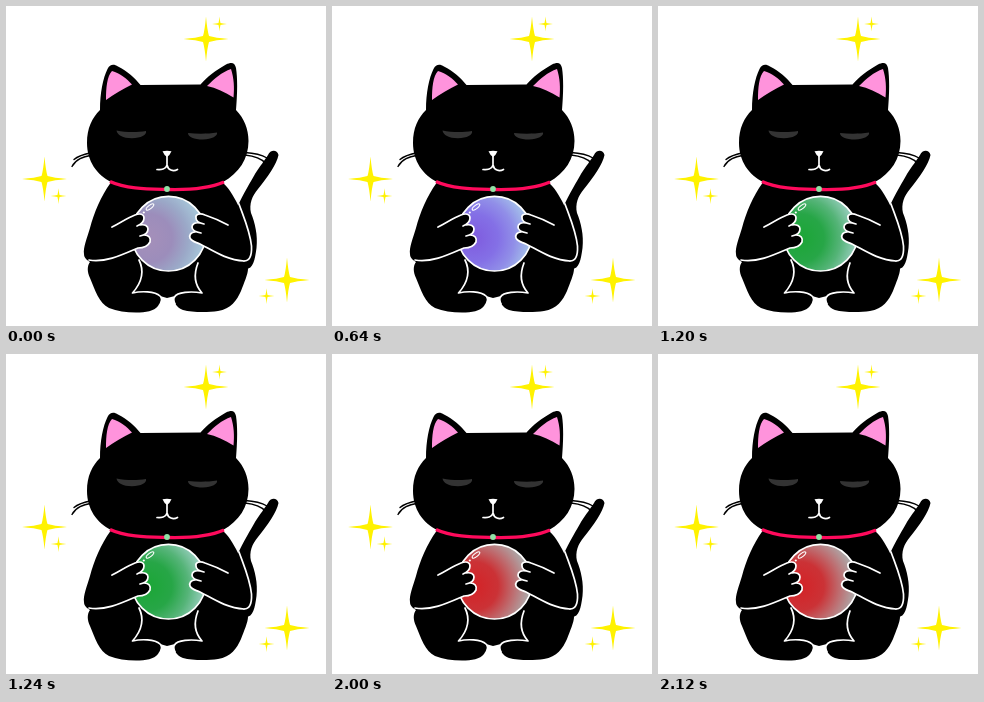
These frames come from a looping animation (320x320 px, 2.24 s). An HTML page:

```html
<!DOCTYPE html>
<html lang="en">
<head>
<meta charset="utf-8">
<title>Cat with a crystal ball</title>
<style>
html, body { margin: 0; width: 100%; height: 100%; overflow: hidden; background: #fff; }
svg { display: block; width: 100vw; height: 100vh; }
.line { fill: none; stroke: #fff; stroke-width: 1.7; stroke-linecap: round; stroke-linejoin: round; }
.hand { fill: #000; }
.whisker { fill: none; stroke: #000; stroke-width: 1.4; stroke-linecap: round; }
</style>
</head>
<body>
<svg viewBox="0 0 320 320">
  <defs>
    <path id="star" fill="#fff200" d="M0-22.500Q1.200-9 3-3Q9-1.200 22.500 0Q9 1.200 3 3Q1.200 9 0 22.500Q-1.200 9-3 3Q-9 1.200-22.500 0Q-9-1.200-3-3Q-1.200-9 0-22.500Z"/>
  </defs>
  <g id="stars"></g>

  <!-- tail -->
  <path d="M262 149C264 144 271 143 272.500 149C271 158 261 172 252 183C246 190 243 198 245 207C249 217 252 229 250.500 242C249 254 247 263 240 263L232 200C234 194 241 182 249 168C255 159 258 155 262 149Z"/>

  <!-- body and legs -->
  <path d="M104.500 177C95 190 88 207 84 222C81 232 77 242 78 248C78 252 81 254 84 256C81 260 81 266 84 272C89 284 93 297 103 302C111 305 120 306.500 130 306.500C140 306.500 148 305 152 300C154 297 156 294 154 290L161 292L169 290C166 295 171 302 177 304C186 306.500 202 306.500 212 305C225 303 231 294 235 285C238 277 242 268 242 263C242 260 241 257 240 255C245 254 246 248 245 241C243 226 238 213 232 199C227 189 222 181 217 177Z"/>
  <path class="line" d="M233 198C238 212 244 225 245.500 240C246 251 243 255 238 255"/>
  <path class="line" d="M133 254C137 262 138 274 126.500 287C135 285 149 285 154 290C156 292 156 295 155 297M192 257C188 267 188 278 196 287C185 285 171 286 168.500 291C167 293 168 296 169 298"/>

  <!-- ball -->
  <g id="balls"></g>
  <circle class="line" cx="162.500" cy="227.700" r="37.300"/>
  <ellipse class="line" style="stroke-width:1.100" cx="144" cy="201" rx="4.600" ry="1.700" transform="rotate(-38 144 201)"/>
  <circle cx="137.800" cy="206.500" r="1.100" fill="#fff"/>

  <!-- hands -->
  <path class="hand" d="M106 221C114 217 121 212 129 209C134 207 138 208 138 212C138 215 136 217 134 219C139 218 142 220 142 223C142 226 140 228 138 229C143 229 145 232 144 236C142 240 138 242 132 242C118 248 105 254 92 255Z"/>
  <path class="line" d="M106 221C114 217 121 212 129 209C134 207 138 208 138 212C138 215 136 218 131 220M134 219C139 218 142 220 142 223C142 226 140 229 134 230M138 229C143 229 145 232 144 236C142 240 138 242 132 242C118 248 100 257 83 254"/>
  <path class="hand" d="M222 219C213 214 205 211 199 209C194 207 189 208 190 212C190 214 192 216 194 217C189 216 186 218 186 221C186 223 187 225 189 226C185 226 183 229 184 232C186 236 190 236 194 238C206 244 220 254 238 255Z"/>
  <path class="line" d="M222 219C213 214 205 211 199 209C194 207 189 208 190 212C190 215 193 217 198 218M194 217C189 216 186 218 186 221C186 224 189 226 195 227M189 226C185 226 183 229 184 232C186 236 190 236 194 238C206 244 220 254 238 255"/>

  <!-- head -->
  <path class="whisker" d="M86 146.500C79 148 72 150 68 153.500M86 149C77 151 70 153 66 160.500M239 146.500C248 147 256 149 261 152M239 149C248 150 255 152 259 157"/>
  <path d="M94 104C94 87 97 72 101.500 63C104 58 108 58 112 60.500C121 65 129 72 134.500 79L194.500 78.500C201 71 210 64 220 58.500C226 55.500 229 57 230 62C232 75 231 91 230 104C238 112 242.500 123 242.500 135C242.500 153 233 167 217 176C183 186 139 186 105 176C91 169 81 155 81 137C81 122 86 112 94 104Z"/>
  <g fill="#ff93dc">
    <path d="M106 65C114 67 121 73 126 78.500C117 83 108 88 100 94C100 82 101 70 106 65Z"/>
    <path d="M225 63C228 72 228.500 82 227.500 91.500C219 86 210 82 201 80C208 73 216 66 225 63Z"/>
  </g>
  <g fill="#333">
    <path d="M110.500 124.500C120 126.500 131 126.500 140 125C141 129 135 132 126 132.200C117 132.200 111 129 110.500 124.500Z"/>
    <path d="M182 127C191 128 202 128 211 126.500C212 130 206 133 197 133.500C188 133.500 182 131 182 127Z"/>
  </g>
  <path fill="#fff" d="M156.500 145.300Q161 144.300 165.500 145.300Q164 149 161 151Q158 149 156.500 145.300Z"/>
  <path class="line" d="M161 149V158.500M151 163.500C155 164 160 163 161 159C162 164 167 166 171.500 163.500"/>

  <!-- collar -->
  <path fill="none" stroke="#ff0a5c" stroke-width="3.300" d="M104 175.500C120 183 142 183 161 183.500C180 184 202 183 218 176"/>
  <circle cx="161" cy="183" r="2.900" fill="#8fe3a6"/>
</svg>
<script>
const NS = "http://www.w3.org/2000/svg";
const LOOP = 2240;

function add(parent, tag, attrs) {
  const el = document.createElementNS(NS, tag);
  for (const key in attrs) el.setAttribute(key, attrs[key]);
  parent.append(el);
  return el;
}

// x, y, scale
const stars = [
  [200, 33, 1], [213.500, 18, .33],
  [38.500, 173, 1], [52.500, 190, .35],
  [281, 274, 1], [260.500, 290, .35]
];
const sky = document.getElementById("stars");
for (const [x, y, s] of stars) {
  add(sky, "use", { href: "#star", transform: `translate(${x} ${y}) scale(${s})` });
}

// start, end, colours from the core at the left outwards
const moods = [
  [0, 600, ["#a38fba", "#9c8dbb", "#9ba9c8", "#a9cbdc"]],
  [600, 1200, ["#8060e0", "#8470e6", "#918fe8", "#a6c6ea"]],
  [1200, 2000, ["#1ea63a", "#27a647", "#55b478", "#9ccfc2"]],
  [2000, LOOP, ["#d2262a", "#cb3236", "#bd7073", "#aab2b2"]]
];
const defs = document.querySelector("defs");
const balls = document.getElementById("balls");

moods.forEach(([start, end, colors], i) => {
  const grad = add(defs, "radialGradient", { id: "mood" + i, cx: .22, cy: .56, r: .78 });
  colors.forEach((color, k) => {
    add(grad, "stop", { offset: [.1, .42, .7, 1][k], "stop-color": color });
  });
  const ball = add(balls, "circle", { cx: 162.500, cy: 227.700, r: 37.300, fill: `url(#mood${i})` });
  const steps = [[0, +(start === 0)], [start, 1], [end, +(end === LOOP)], [LOOP, +(end === LOOP)]];
  ball.animate(
    steps.map(([t, opacity]) => ({ offset: t / LOOP, opacity, easing: "step-end" })),
    { duration: LOOP, iterations: Infinity }
  );
});
</script>
</body>
</html>
```
